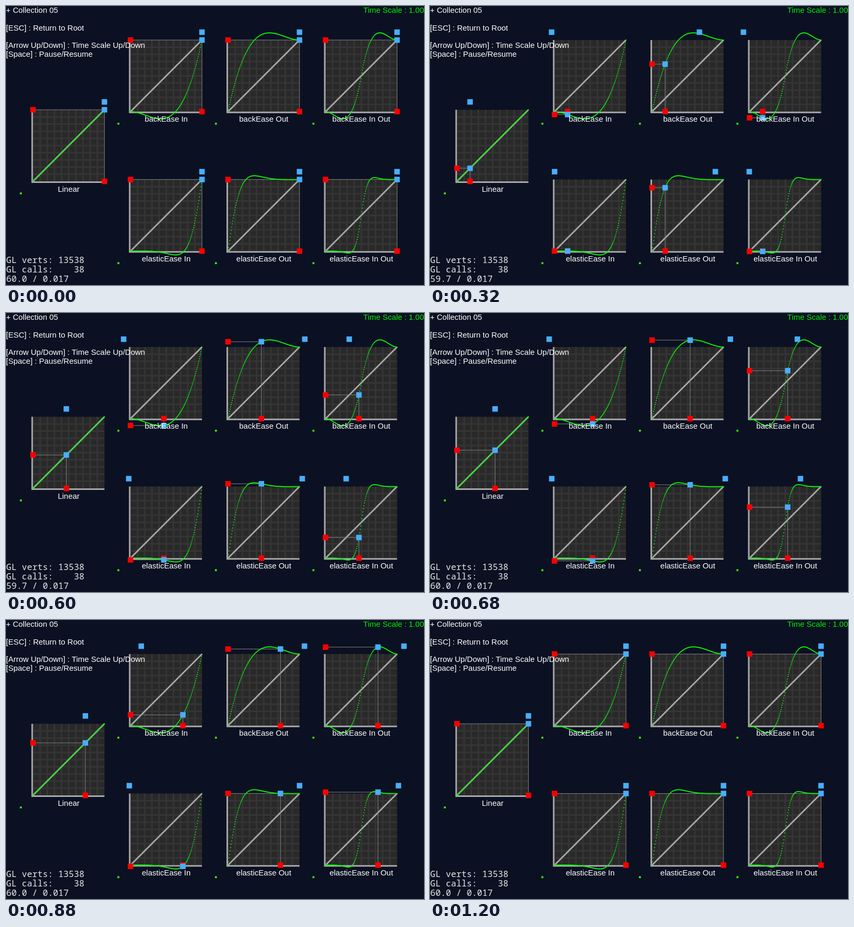
An HTML page with a canvas that plays this animation: 800x533 px, repeating every 1520 ms.

```html
<!DOCTYPE html>
<html lang="en">
<head>
<meta charset="utf-8">
<title>Easing curves</title>
<style>
  html, body { margin: 0; width: 100%; height: 100%; overflow: hidden; background: #0b1122; }
  canvas { display: block; }
</style>
</head>
<body>
<canvas id="stage" width="800" height="533"></canvas>
<script>
const ctx = document.getElementById('stage').getContext('2d');
const LOOP = 1520, STEP = 40, SIZE = 136.8, DOTS = 136;
const SANS = '15px "Liberation Sans", Arial, sans-serif';
const MONO = '16.6px "Noto Sans Mono", monospace';
const RED = '#fa0000', BLUE = '#48aeff', GREEN = '#08f808', AXIS = '#a9a8a9';

const mirror = f => u => 1 - f(1 - u);
const inOut = f => u => u < 0.5 ? f(2 * u) / 2 : 1 - f(2 - 2 * u) / 2;
const backIn = s => u => u * u * ((s + 1) * u - s);
const elasticIn = u => u <= 0 ? 0 : u >= 1 ? 1 : 2 ** (10 * (u - 1)) * Math.cos(2 * Math.PI * (1 - u));

const plots = [
  ['Linear', 0, 1, u => u],
  ['backEase In', 1, 0, backIn(1.70158)],
  ['backEase Out', 2, 0, mirror(backIn(1.70158))],
  ['backEase In Out', 3, 0, inOut(backIn(1.70158 * 1.525))],
  ['elasticEase In', 1, 2, elasticIn],
  ['elasticEase Out', 2, 2, mirror(elasticIn)],
  ['elasticEase In Out', 3, 2, inOut(elasticIn)]
].map(([name, col, row, ease]) => ({ name, ease, x: 51.6 + col * 186.67, y: 201.8 + row * 133.25 }));

function square(x, y, size, color) {
  ctx.fillStyle = color;
  ctx.fillRect(x - size / 2, y - size / 2, size, size);
}

function line(width, color, ...points) {
  ctx.lineWidth = width;
  ctx.strokeStyle = color;
  ctx.beginPath();
  points.forEach(([x, y]) => ctx.lineTo(x, y));
  ctx.stroke();
}

function text(str, x, y, align = 'left', color = '#fff', font = SANS) {
  ctx.font = font;
  ctx.textAlign = align;
  ctx.fillStyle = color;
  ctx.fillText(str, x, y);
}

function drawGrid(x, y) {
  ctx.fillStyle = '#292929';
  ctx.fillRect(x - 2, y - SIZE, SIZE + 2, SIZE + 2);
  for (let i = 1; i < 10; i++) {
    const d = i * SIZE / 10;
    line(3, '#353535', [x + d, y], [x + d, y - SIZE]);
    line(3, '#353535', [x, y - d], [x + SIZE, y - d]);
  }
}

function drawPlot({ x, y, name, ease }, u) {
  const right = x + SIZE, top = y - SIZE;
  const v = ease(u), px = x + u * SIZE, py = y - v * SIZE;

  drawGrid(x, y);
  line(3, AXIS, [x, y], [right, top]);
  line(3, AXIS, [x - 1.5, top], [x - 1.5, y + 1.5], [right, y + 1.5]);
  line(1, '#858585', [x, py], [px, py], [px, y]);

  for (let i = 0; i <= DOTS; i++) {
    const k = i / DOTS;
    square(x + k * SIZE, y - ease(k) * SIZE, 1.7, GREEN);
  }
  square(x - 23.2, y + 23, 3.6, '#40f808');

  square(x, py, 10.5, RED);
  square(px, y, 10.5, RED);
  square(px, py, 10.5, BLUE);
  square(x + v * SIZE, top - 15, 10.5, BLUE);
  text(name, x + SIZE / 2, y + 19.6, 'center');
}

function draw(t) {
  // 60 ticks per second; the markers rest at the end until the next run
  const tick = Math.round(t * 0.06 - 8.5);
  const u = tick < 0 ? 1 : Math.min(1, tick / 60);

  ctx.fillStyle = '#0b1122';
  ctx.fillRect(0, 0, 800, 533);
  plots.forEach(p => drawPlot(p, u));

  text('+ Collection 05', 0, 13);
  text('[ESC] : Return to Root', 0, 46.5);
  text('[Arrow Up/Down] : Time Scale Up/Down', 0, 80);
  text('[Space] : Pause/Resume', 0, 96.5);
  text('Time Scale : 1.00', 800, 13, 'right', '#00f000');

  const fps = t >= 140 && t < 640 ? '59.7' : '60.0';
  ['GL verts: 13538', 'GL calls:    38', fps + ' / 0.017'].forEach((s, i) =>
    text(s, 0.5, 490.5 + i * 18.2, 'left', '#e8e8e8', MONO));
}

function frame() {
  const t = performance.now() % LOOP;
  draw(Math.min(1200, Math.floor(t / STEP) * STEP));
  requestAnimationFrame(frame);
}
frame();
</script>
</body>
</html>
```
